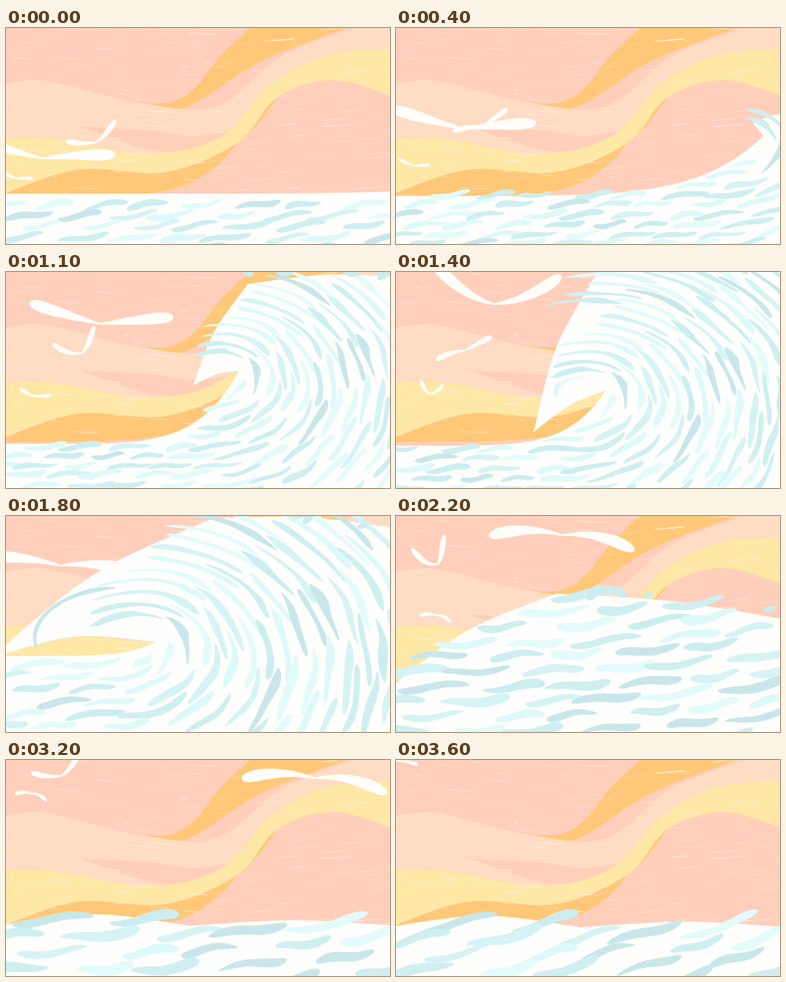
Animation, 480 px wide and 270 px high, one loop 3.7 s. Source, as an HTML page with a canvas:

```html
<!DOCTYPE html>
<html lang="en">
<head>
<meta charset="utf-8">
<title>Waves</title>
<style>
html, body { margin: 0; width: 100%; height: 100%; overflow: hidden; background: #ffcfbb; }
canvas { display: block; width: 480px; height: 270px; }
</style>
</head>
<body>
<canvas id="stage" width="480" height="270"></canvas>
<script>
const ctx = document.getElementById('stage').getContext('2d');
const LOOP = 3700, STEP = 100;
const TIMES = [0, 700, 1400, 1800, 2200, 2700, 3600];
const WHITE = '#fefffc';
const BLUES = ['#c9e7ea', '#cfeff1', '#d6f3f5', '#def9fa', '#cceef0', '#e3fbfb'];

const rand = (a, b, c = 0) => {
  const n = Math.sin(a * 127.1 + b * 311.7 + c * 74.7) * 43758.5453;
  return n - Math.floor(n);
};
const lerp = (a, b, f) => a + (b - a) * f;

// Value of a keyed pose at time t.
function at(keys, t) {
  let i = 0;
  while (i < TIMES.length - 2 && t >= TIMES[i + 1]) i++;
  const f = (t - TIMES[i]) / (TIMES[i + 1] - TIMES[i]);
  const pose = {};
  for (const k in keys[i]) pose[k] = lerp(keys[i][k], keys[i + 1][k], f);
  return pose;
}

// Adds a smooth line through [x, y] points.
function curve(path, p) {
  const P = i => p[Math.max(0, Math.min(p.length - 1, i))];
  path.lineTo(...p[0]);
  for (let i = 0; i < p.length - 1; i++) {
    const [a, b, c, d] = [P(i - 1), P(i), P(i + 1), P(i + 2)];
    path.bezierCurveTo(
      b[0] + (c[0] - a[0]) / 6, b[1] + (c[1] - a[1]) / 6,
      c[0] - (d[0] - b[0]) / 6, c[1] - (d[1] - b[1]) / 6, ...c);
  }
}

function shape(color, ...curves) {
  const path = new Path2D();
  curves.forEach(c => curve(path, c));
  path.closePath();
  ctx.fillStyle = color;
  ctx.fill(path);
  return path;
}

const yellowTop = [[-5, 138], [60, 138], [180, 157], [270, 135], [330, 71], [400, 34], [485, 25]];
const yellowBottom = [[485, 86], [410, 65], [340, 86], [290, 143], [200, 180], [90, 177], [-5, 208]];

function drawSky() {
  ctx.fillStyle = '#ffcfbb';
  ctx.fillRect(0, 0, 480, 270);
  shape('#ffc878', [[165, 93], [205, 93], [236, 75], [268, 35], [305, 0]],
    [[425, 0], [318, 42], [225, 99], [165, 93]]);
  shape('#ffdcc3', [[-5, 71], [50, 66], [165, 93], [262, 98], [345, 35], [435, 0]],
    [[485, 0], [485, 25]], [...yellowTop].reverse());
  shape('#ffcfba', [[92, 123], [180, 128], [235, 135], [292, 127]],
    [[230, 154], [180, 152], [92, 123]]);
  shape('#ffc878', yellowBottom.slice(2), [[-5, 213], [180, 207], [260, 175], [311, 112]]);
  shape('#ffe7a6', yellowTop, yellowBottom);

  ctx.strokeStyle = '#fff4e8';
  ctx.lineCap = 'round';
  for (let i = 0; i < 170; i++) {
    const x = rand(i, 1) * 480, y = rand(i, 2) * 205;
    const len = 3 + rand(i, 3) ** 2 * 35;
    ctx.globalAlpha = 0.25 + rand(i, 4) * 0.5;
    ctx.lineWidth = 0.4 + rand(i, 5) * 0.8;
    ctx.beginPath();
    ctx.moveTo(x, y);
    ctx.lineTo(x + len, y + len * (x < 240 ? 0.05 : -0.08));
    ctx.stroke();
  }
  ctx.globalAlpha = 1;
}

// Each bird follows a path and flaps: peak is the time its wings are highest.
const spots = (...list) => list.map(([x, y]) => ({ x, y }));
const BIRDS = [
  { span: 92, tilt: 0.1, rest: 0.15, flap: 0.35, peak: 1400,
    path: spots([45, 163], [112, 98], [122, 40], [68, 62], [208, 24], [282, 89], [470, -30]) },
  { span: 38, tilt: -0.4, rest: 0.45, flap: 0.5, peak: 2200,
    path: spots([112, 143], [105, 106], [86, 98], [150, 100], [52, 60], [49, 52], [85, -6]) },
  { span: 21, tilt: 0.2, rest: 0.2, flap: 0.6, peak: 1400,
    path: spots([13, 188], [28, 160], [42, 152], [110, 125], [50, 124], [63, 92], [7, 2]) }
];

function wing(x0, y0, span, angle, bow) {
  const x2 = x0 + span * Math.cos(angle), y2 = y0 + span * Math.sin(angle);
  const x1 = (x0 + x2) / 2, y1 = lerp(y0, y2, 0.35) + bow;
  const upper = [], lower = [];
  for (let i = 0; i <= 12; i++) {
    const s = Math.sin(i / 12 * Math.PI / 2);
    const x = lerp(lerp(x0, x1, s), lerp(x1, x2, s), s);
    const y = lerp(lerp(y0, y1, s), lerp(y1, y2, s), s);
    const dx = lerp(x1 - x0, x2 - x1, s), dy = lerp(y1 - y0, y2 - y1, s);
    const w = (1 + span * 0.1 * s) * Math.sqrt(1 - s ** 6) / Math.hypot(dx, dy);
    upper.push([x - dy * w, y + dx * w]);
    lower.unshift([x + dy * w, y - dx * w]);
  }
  shape('#fffefa', upper, lower);
}

function drawBirds(t) {
  for (const { span, tilt, rest, flap, peak, path } of BIRDS) {
    const { x, y } = at(path, t);
    const beat = Math.cos((t - peak) / 1300 * 2 * Math.PI) * Math.min(1, t / 600);
    const lift = rest + flap * beat;
    const bow = span * (lift * 0.4 - 0.1);
    wing(x, y, span, tilt - lift, bow);
    wing(x, y, span, Math.PI + tilt + lift, bow);
  }
}

// Wave poses. (x, y): inside of the barrel, (tipX, tipY): lip,
// (topX, topY): crest, right: water height at the right edge,
// flat: 0 curls the blobs around the barrel, 1 lays them level.
const level = (y, size, tilt) => ({
  x: 150, y: y + 40, base: y, tipX: -10, tipY: y, topX: 230, topY: y, right: y, flat: 1, size, tilt
});
const POSES = [
  { x: 630, y: 195, base: 207, tipX: 618, tipY: 193, topX: 665, topY: 191, right: 207, flat: 0, size: 60, tilt: -0.16 },
  { x: 331, y: 90, base: 212, tipX: 317, tipY: 64, topX: 365, topY: 42, right: 54, flat: 0, size: 50, tilt: -0.12 },
  { x: 262, y: 148, base: 217, tipX: 172, tipY: 200, topX: 255, topY: -5, right: -30, flat: 0, size: 54, tilt: -0.1 },
  { x: 187, y: 157, base: 175, tipX: -20, tipY: 178, topX: 260, topY: 2, right: 15, flat: 0, size: 68, tilt: -0.14 },
  { ...level(216, 82, -0.08), topX: 200, topY: 97, right: 130 },
  level(205, 98, 0.08),
  level(209, 88, -0.24)
];

function waveEdge({ x, y, base, tipX, tipY, topX, topY, right }) {
  const face = [], lip = [[x, y]], back = [[tipX, tipY]], crest = [[topX, topY]];
  for (let i = 0; i <= 8; i++) {
    const f = 1 - (1 - i / 8) ** 2;
    face.push([lerp(-10, x, f), lerp(base, y, f ** 6)]);
  }
  lip.push([(x + tipX) / 2, (y + tipY) / 2 - Math.abs(x - tipX) * 0.08], [tipX, tipY]);
  const dx = topX - tipX, dy = topY - tipY;
  back.push([tipX + dx / 2 + dy * 0.06, tipY + dy / 2 - dx * 0.06], [topX, topY]);
  crest.push([(topX + 490) / 2, (topY + right) / 2 - 7], [490, right]);
  return shape(WHITE, face, lip, back, crest, [[490, 280], [-10, 280]]);
}

function drawBlobs(t, edge, { x: barrelX, y: barrelY, flat, size, tilt }) {
  const cx = barrelX - 30, cy = barrelY + 5;
  const extra = 3000 ** flat - 1;
  const width = size * 0.17, drift = t * 0.03;
  const turn = Math.PI * 1.5;
  // Level water left of the barrel, wound around it on the right.
  const bend = (u, v) => {
    if (u < 0) return [cx + u, cy + v];
    const r = v + extra, a = Math.min(u / r, turn + 0.1);
    const stretch = lerp(a > Math.PI ? 1.9 : 1.3, 1, flat);
    return [cx + r * stretch * Math.sin(a), cy - extra + r * Math.cos(a)];
  };
  const inside = ([x, y]) => ctx.isPointInPath(edge, x, y + 2);
  const rowGap = width * 1.35, colGap = size * 1.07;

  for (let j = Math.ceil(-200 / rowGap); j * rowGap < 300; j++) {
    const v = (j + 0.5 + (rand(j, 9) - 0.5) * 0.3) * rowGap, r = v + extra;
    if (r < 8) continue;
    const end = Math.min(r * turn, 1500);
    for (let i = Math.floor(-700 / colGap); i * colGap < end; i++) {
      const u = (i + (j & 1) * 0.5 + (rand(i, j) - 0.5) * 0.35) * colGap + drift;
      if (u > end) continue;
      const [x, y] = bend(u, v);
      if (x < -70 || x > 550 || y > 300 || !inside([x, y])) continue;

      let len = size * (0.75 + rand(i, j, 1) * 0.4);
      if (u > 0) len = Math.min(len, r);
      const tail = bend(u - len / 2, v - tilt * len / 2), head = bend(u + len / 2, v + tilt * len / 2);
      if (!inside(tail) && !inside(head)) continue;

      const half = width * (0.4 + rand(i, j, 2) * 0.2);
      const thin = 0.4 + rand(i, j, 3) * 0.6, phase = rand(i, j, 4) * 6;
      const upper = [], lower = [];
      for (let k = 0; k <= 10; k++) {
        const s = (1 - Math.cos(Math.PI * k / 10)) / 2, du = (s - 0.5) * len;
        const w = half * Math.sqrt(1 - (2 * s - 1) ** 4) * lerp(thin, 1.4 - thin, s);
        const mid = v + tilt * du + width * 0.18 * Math.sin(s * 6 + phase);
        upper.push(bend(u + du, mid - w));
        lower.unshift(bend(u + du, mid + w));
      }
      shape(BLUES[Math.floor(rand(i, j, 5) * BLUES.length)], upper, lower);
    }
  }
}

// Drops thrown up along the crest while the wave is high.
function drawSpray(t, { topX, topY, right }) {
  ctx.fillStyle = '#cdecef';
  for (let i = 0; i < 18; i++) {
    const age = (t - 600 - rand(i, 21) * 1600) / 300;
    if (age < 0 || age > 1) continue;
    const f = rand(i, 22);
    const x = lerp(topX, 490, f) - age * 12;
    const y = lerp(topY, right, f) - 50 * age * (1 - age);
    const r = 3 + rand(i, 23) * 3;
    ctx.beginPath();
    ctx.ellipse(x, y, r * 2, r, rand(i, 24) * 2 - 1, 0, 7);
    ctx.fill();
  }
}

function frame(now) {
  const t = Math.floor(now % LOOP / STEP) * STEP;
  const wave = at(POSES, t);
  drawSky();
  drawBirds(t);
  drawBlobs(t, waveEdge(wave), wave);
  drawSpray(t, wave);
  requestAnimationFrame(frame);
}
requestAnimationFrame(frame);
</script>
</body>
</html>
```
